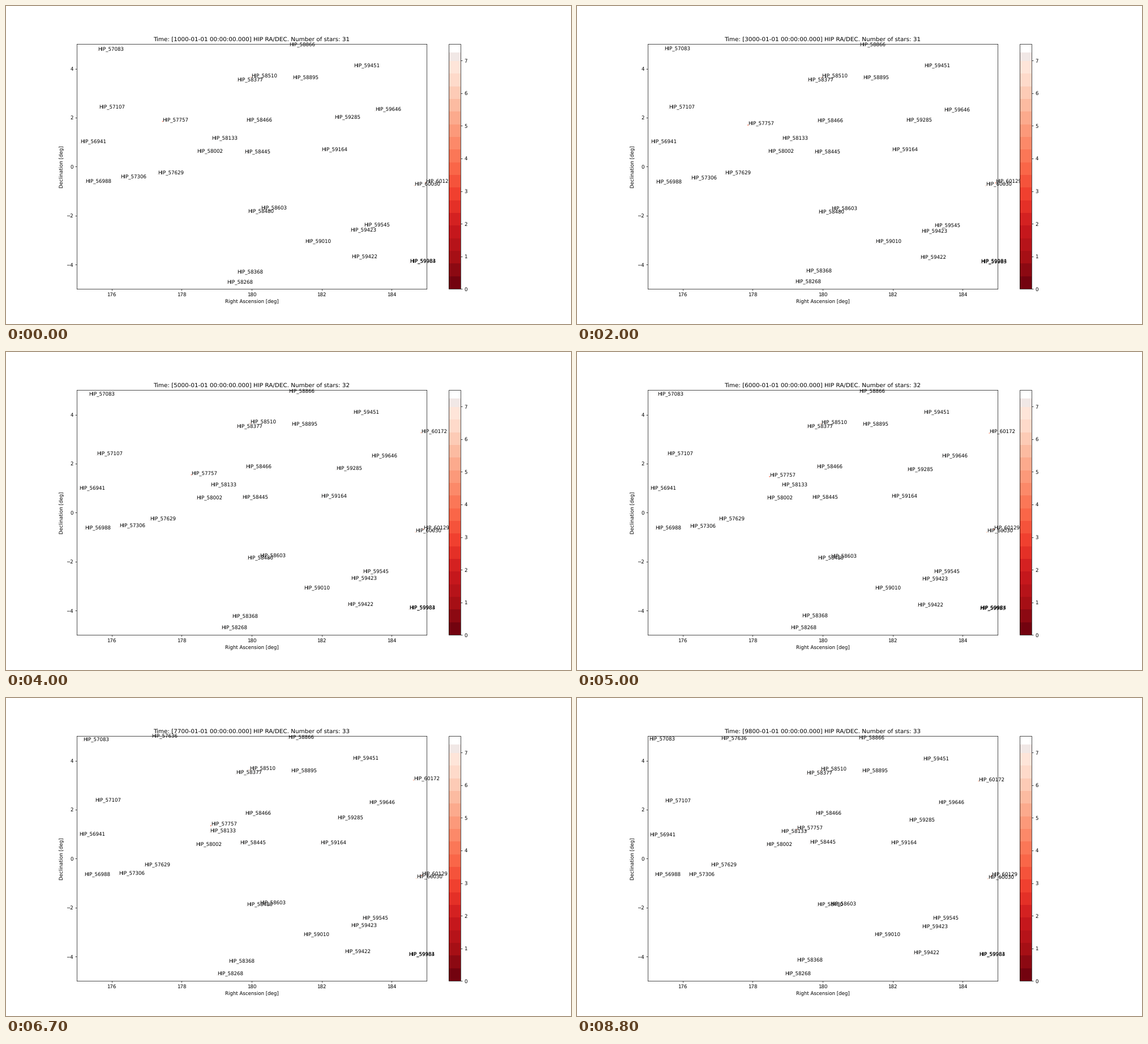
Write a matplotlib script that moves like this. It is 998 px wide and 561 px high and loops after 8.9 s.

```python
import numpy as np
import matplotlib.pyplot as plt
from matplotlib.animation import FuncAnimation
from matplotlib.colors import ListedColormap

W, H, DPI = 998, 561, 62.375
FRAMES, INTERVAL = 89, 100
START, STEP, EPOCH = 1000, 100, 2000  # years
MAX_MAG = 7.5
RA, DEC = (175, 185), (-5, 5)

plt.rcParams["font.family"] = "DejaVu Sans"
plt.rcParams["text.hinting"] = "none"

# HIP number: declination at the epoch
STARS = {
    56941: 0.96, 56988: -0.67, 57083: 4.74, 57107: 2.37, 57306: -0.50,
    57629: -0.31, 57636: 5.17, 57757: 1.77, 58002: 0.56, 58133: 1.10,
    58268: -4.77, 58368: -4.35, 58377: 3.48, 58445: 0.54, 58466: 1.83,
    58480: -1.90, 58510: 3.65, 58603: -1.76, 58866: 4.92, 58895: 3.57,
    59010: -3.12, 59164: 0.63, 59285: 1.90, 59422: -3.75, 59423: -2.68,
    59451: 4.06, 59545: -2.45, 59646: 2.27, 59983: -3.94, 59984: -3.93,
    60030: -0.78, 60129: -0.66, 60172: 3.32,
}

# proper motion of the faster stars, arcsec per year
MOTION = {
    57083: (-0.23, 0.04), 57107: (-0.06, -0.03), 57306: (-0.03, -0.10),
    57629: (-0.21, 0.0), 57636: (-0.09, -0.15), 57757: (0.74, -0.27),
    58268: (-0.15, 0.01), 58368: (-0.13, 0.07), 58445: (-0.07, 0.03),
    58603: (-0.02, -0.07), 59285: (0.04, -0.18), 59422: (-0.10, -0.07),
    59423: (0.01, -0.07), 59646: (-0.09, -0.02), 60030: (0.03, -0.02),
    60129: (-0.06, -0.02), 60172: (-0.29, -0.07),
}
SLOW = (-0.02, -0.02)
BRIGHT = {57757: 3.6, 60129: 3.9, 60172: 5.0, 58510: 5.4, 60030: 5.9}


def right_ascension(hip):
    """The catalogue is numbered in order of right ascension."""
    return np.interp(hip,
                     [56941, 57629, 58133, 58603, 59164, 59451, 60172],
                     [175.095, 177.26, 178.845, 180.255, 181.99, 182.91,
                      185.085])


def banded_reds():
    """Reversed reds in flat bands, two narrow pale ones at the top."""
    edges = np.append(np.linspace(0, 6.98, 19), [7.24, MAX_MAG])
    colors = plt.get_cmap("Reds_r")((edges[:-1] + edges[1:]) / 2 / MAX_MAG)
    colors[-2, :3] = 0.945, 0.91, 0.902
    colors[-1, :3] = 1
    mags = (np.arange(432) + 0.5) / 432 * MAX_MAG
    return ListedColormap(colors[np.searchsorted(edges, mags) - 1])


ids = np.array(list(STARS))
home = np.column_stack([right_ascension(ids), list(STARS.values())])
speed = np.array([MOTION.get(i, SLOW) for i in ids]) / 3600
mags = np.array([BRIGHT.get(i, 7.0) for i in ids])

fig = plt.figure(figsize=(W / DPI, H / DPI), dpi=DPI)
ax = fig.add_axes([0.125, 0.11, 0.6195, 0.77])
cax = fig.add_axes([0.78375, 0.11, 0.0212, 0.77])
dots = ax.scatter(home[:, 0], home[:, 1], s=1, c=mags, cmap=banded_reds(),
                  vmin=0, vmax=MAX_MAG)
fig.colorbar(dots, cax=cax, ticks=range(8))
ax.set(xlim=RA, ylim=DEC, xticks=range(176, 185, 2), yticks=range(-4, 5, 2),
       xlabel="Right Ascension [deg]", ylabel="Declination [deg]")
title = ax.set_title("")
labels = [ax.text(*pos, f"HIP_{i}") for i, pos in zip(ids, home)]


def update(frame):
    year = START + STEP * frame
    pos = home + speed * (year - EPOCH)
    seen = ((pos > (RA[0], DEC[0])) & (pos < (RA[1], DEC[1]))).all(axis=1)
    dots.set_offsets(pos[seen])
    dots.set_array(mags[seen])
    for label, p, on in zip(labels, pos, seen):
        label.set_position(p)
        label.set_visible(bool(on))
    title.set_text(f"Time: [{year}-01-01 00:00:00.000] "
                   f"HIP RA/DEC. Number of stars: {seen.sum()}")
    return [dots, title, *labels]


anim = FuncAnimation(fig, update, frames=FRAMES, interval=INTERVAL,
                     repeat=True, repeat_delay=0)
plt.show()
```
